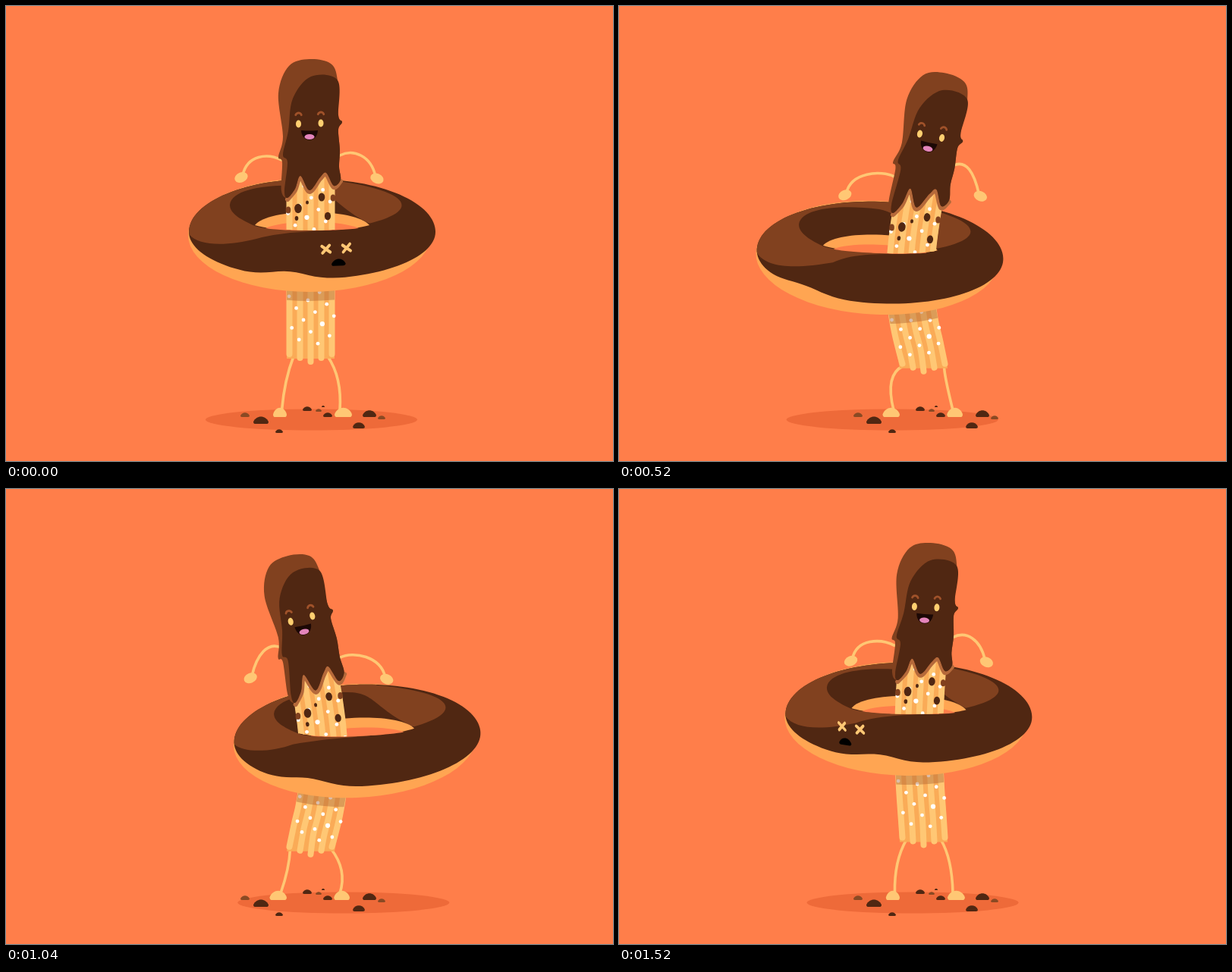
An HTML page with a canvas for the animation above (1.56 s loop, 800 by 600 pixels).

```html
<!DOCTYPE html>
<html>
<head>
<meta charset="utf-8">
<style>
html, body { margin: 0; width: 100%; height: 100%; overflow: hidden; background: #ff7e4a; }
canvas { display: block; }
</style>
</head>
<body>
<canvas id="stage" width="800" height="600"></canvas>
<script>
const ctx = document.getElementById('stage').getContext('2d');
const { sin, cos, PI } = Math, TAU = PI * 2, CYCLE = 780;
const BG = '#ff7e4a', DARK = '#502712', LIGHT = '#81411f', RIM = '#b5693a';
const DOUGH = '#ffa552', CREAM = '#ffc774', STRIPE = '#faab57';

// Chocolate coat: right side downwards, drips leftwards, then each left side upwards
const COAT_RIGHT = [[437, 98], [438, 144], [443, 153], [438, 163], [440, 190], [439, 212]];
const DRIPS = [[441, 229], [432, 237], [422, 220], [414, 226], [400, 243], [388, 224], [381, 241], [371, 253]];
const COAT_LEFT = [[363, 244], [364, 206], [359, 199], [365, 172], [359, 115], [373, 79], [400, 70], [428, 76]];
const FRONT_LEFT = [[367, 244], [371, 206], [365, 196], [372, 165], [378, 122], [402, 93]];

const WALL = new Path2D('M295 262C298 240 350 234 400 238C430 242 430 262 479 287C455 298 350 298 328 290C305 280 295 272 295 262');
const INNER_DOUGH = new Path2D('M328 289C345 266 460 266 479 289C450 298 355 298 328 289');
const HOLE = new Path2D('M342 293C365 282 440 282 465 293C440 297 360 297 342 293');
const ABOVE_LIP = new Path2D('M0-100V288L328 289C355 298 450 298 479 289L800 288V-100Z');

let bend, drop, shift;

const clamp = u => Math.min(Math.max(u, 0), 1);
const range = (n, f) => Array.from({ length: n }, (_, i) => f(i));

// Centre line: a straight head on an arching body
function spine(y) {
  const u = clamp((y - 205) / 250), arch = sin(PI * u), above = Math.max(205 - y, 0);
  return [400 + bend * (18 * arch - .22 * above),
    y + drop * (20 - 3 * u + 23 * arch) + .025 * bend * bend * above];
}

function tilt(y) {
  const [ax, ay] = spine(y - 3), [bx, by] = spine(y + 3);
  return Math.atan2(ax - bx, by - ay);
}

function warp([x, y]) {
  const [sx, sy] = spine(y), a = tilt(y), d = x - 400;
  return [sx + d * cos(a), sy + d * sin(a)];
}

// Smooth curve through points
function trace(points, closed) {
  const n = points.length;
  const at = i => points[closed ? (i + n) % n : Math.min(Math.max(i, 0), n - 1)];
  ctx.beginPath();
  ctx.moveTo(...at(0));
  for (let i = 0; i < (closed ? n : n - 1); i++) {
    const a = at(i - 1), b = at(i), c = at(i + 1), d = at(i + 2);
    ctx.bezierCurveTo(b[0] + (c[0] - a[0]) / 6, b[1] + (c[1] - a[1]) / 6,
      c[0] - (d[0] - b[0]) / 6, c[1] - (d[1] - b[1]) / 6, ...c);
  }
}

function fill(color, path) {
  ctx.fillStyle = color;
  path ? ctx.fill(path) : ctx.fill();
}

function stroke(color, width) {
  ctx.strokeStyle = color;
  ctx.lineWidth = width;
  ctx.stroke();
}

function ellipse(x, y, rx, ry, color, angle = 0) {
  ctx.beginPath();
  ctx.ellipse(x, y, rx, ry, angle, 0, TAU);
  fill(color);
}

function dome(x, base, rx, h, color) {
  ctx.beginPath();
  ctx.moveTo(x - rx, base - h * .3);
  ctx.bezierCurveTo(x - rx * .6, base - h * 1.25, x + rx * .6, base - h * 1.25, x + rx, base - h * .3);
  ctx.quadraticCurveTo(x + rx, base, x + rx * .7, base);
  ctx.lineTo(x - rx * .7, base);
  ctx.quadraticCurveTo(x - rx, base, x - rx, base - h * .3);
  fill(color);
}

function isolated(draw) {
  ctx.save();
  draw();
  ctx.restore();
}

// Runs draw in a frame pinned to the bent stick
function pinned(x, y, draw) {
  isolated(() => {
    ctx.translate(...warp([x, y]));
    ctx.rotate(tilt(y));
    draw();
  });
}

function enterDonut() {
  ctx.translate(403 + shift, 300 + 40 * drop);
  ctx.rotate(-.043 * bend);
  ctx.translate(-403, -300);
}

function stickOutline() {
  const side = x => range(9, i => warp([x, 225 + i * 30]));
  ctx.beginPath();
  [...side(370), ...side(433).reverse()].forEach(p => ctx.lineTo(...p));
  ctx.closePath();
}

function drawStick() {
  stickOutline();
  fill(STRIPE);
  for (let i = 0; i < 5; i++) {
    const end = 469 - 5 * Math.abs(i - 2);
    trace(range(9, j => warp([373.5 + 14 * i, 225 + (end - 225) * j / 8])));
    stroke(CREAM, 8);
  }
  for (let i = 0; i < 42; i++) {
    const r = i % 9 ? 2.4 : 3.1;
    ellipse(...warp([368 + 65 * (i * .382 % 1), 232 + 5.2 * i]), r, r, '#fff');
  }
  for (const [x, y, r] of [[416, 252, 4.3], [424, 277, 4.1], [385, 267, 4.8], [397, 259, 2], [383, 280, 2.3]])
    ellipse(...warp([x, y]), r, r * 1.3, DARK, tilt(y));
  for (const [x, y] of [[372, 269], [431, 253]]) ellipse(...warp([x, y]), 3.3, 4.5, LIGHT);
}

function drawLegs() {
  const leg = (hip, cx, cy, fx) => {
    ctx.beginPath();
    ctx.moveTo(...hip);
    ctx.quadraticCurveTo(cx, cy, fx, 533);
    stroke(CREAM, 3.6);
  };
  leg(warp([379 - 6 * drop, 462]), 367 + 12 * bend - 7 * drop, 493 + 7 * bend, 363.5 - 2 * drop);
  leg(warp([424 + 6 * drop, 462]), 443 + 11 * bend - 5 * drop, 490 + 8 * bend + 6 * drop, 440);
  dome(361 - 3 * drop, 542, 9 + 3 * drop, 12, CREAM);
  dome(444.5 - 2.5 * drop, 542, 11.5 - 1.5 * drop, 12, CREAM);
}

function drawArms() {
  const arm = (sx, sy, hx, hy, side) => {
    ctx.beginPath();
    ctx.moveTo(sx, sy);
    ctx.bezierCurveTo(sx + 18 * side, sy - 9, hx - 8 * side, hy - 30, hx - 2 * side, hy - 3);
    stroke(CREAM, 3.6);
    ellipse(hx, hy, 9, 6.5, CREAM, .4 * side);
  };
  arm(363, 203 - 8 * bend + 19 * drop, 310 + 12.5 * bend, 226 + 31 * drop, -1);
  arm(440, 197 + 6 * bend + 26 * drop, 489 + 13 * bend, 227.5 + 31 * drop, 1);
}

function drawDonutFace(spin) {
  const put = (angle, radius, y, draw) => {
    const c = cos(angle), s = sin(angle);
    if (c < .06) return;
    isolated(() => {
      ctx.transform(c, -.22 * s, 0, 1, 403 + radius * s, y + 38 * c);
      draw();
    });
  };
  for (const side of [-1, 1]) put(spin + side * .096, 145, 283, () => {
    ctx.beginPath();
    ctx.moveTo(-5.5, -4); ctx.lineTo(5.5, 4);
    ctx.moveTo(-4.5, 5); ctx.lineTo(4.5, -5);
    stroke(CREAM, 4);
  });
  put(spin, 158, 301, () => dome(0, 4.5, 9.5, 9, '#000'));
}

// Elliptic crust whose lower hem has one wandering dent
function crustOutline() {
  const dentX = 372 + 18 * bend - 72 * drop;
  ctx.beginPath();
  for (let a = 0; a < TAU; a += .05) {
    const x = 403.5 + 162.5 * cos(a);
    const ry = sin(a) < 0 ? 70 : 62 + 3 * drop - 9 * Math.exp(-(((x - dentX) / 35) ** 2));
    ctx.lineTo(x, 298 + ry * sin(a));
  }
  ctx.closePath();
}

function drawDonut(spin) {
  ellipse(400, 302, 160, 75, DOUGH);
  crustOutline();
  fill(DARK);
  isolated(() => {
    ctx.clip();
    ctx.beginPath();
    ctx.moveTo(238, 296);
    ctx.bezierCurveTo(248, 318 - 5 * bend, 290, 317 - 5 * bend, 330 - 12 * bend, 307 - 4 * bend);
    ctx.bezierCurveTo(370, 296, 410, 298, 440, 294);
    ctx.bezierCurveTo(550, 278, 550, 246, 432, 230);
    ctx.lineTo(400, 200);
    ctx.lineTo(200, 200);
    fill(LIGHT);
  });
  fill(DARK, WALL);
  fill(DOUGH, INNER_DOUGH);
  fill(BG, HOLE);
  drawDonutFace(spin);
}

function drawHead() {
  trace(DRIPS.map(([x, y]) => warp([x, y + 2])));
  stroke(RIM, 6);
  for (const [left, color] of [[COAT_LEFT, LIGHT], [FRONT_LEFT, DARK]]) {
    trace([...COAT_RIGHT, ...DRIPS, ...left].map(warp), true);
    fill(color);
  }
  for (const [x, y] of [[385.5, 155.5], [415, 154.5]]) pinned(x, y, () => {
    ellipse(0, 0, 3.5, 5, '#ffcf70');
    ctx.beginPath();
    ctx.arc(0, -10.5, 4, PI * 1.1, PI * 1.9);
    stroke('#a0522a', 2.8);
  });
  pinned(400, 164, () => {
    ctx.beginPath();
    ctx.moveTo(-11, 0);
    ctx.quadraticCurveTo(0, 1, 11, 0);
    ctx.bezierCurveTo(10, 17, -10, 17, -11, 0);
    fill('#1c0805');
    ctx.clip();
    ellipse(0, 8.5, 6.5, 3.6, '#e485bb');
  });
}

function drawGround() {
  ellipse(402.5 + .71 * shift, 545.5, 139.5, 14, '#ee6a39');
  const crumbs = [[336, 551, 10], [360, 563, 5], [397, 534, 6], [418, 529, 2], [424, 542, 6],
    [479, 542, 9], [465, 557, 8], [315, 542, 6], [412, 535, 4], [495, 545, 5]];
  crumbs.forEach(([x, y, r], i) => dome(x, y, r, r * .95, i < 7 ? DARK : '#8a4a24'));
}

function render(ms) {
  const a = Math.floor(ms / 40) * 40 % CYCLE / CYCLE * TAU;
  shift = 66.6 * sin(a) + 3.4 * sin(3 * a) - 2.2 * sin(5 * a);
  bend = shift / 61;
  drop = (1 - cos(a)) / 2;
  const spin = a + .28 * Math.tanh(7 * sin(a + .16));

  ctx.lineCap = ctx.lineJoin = 'round';
  ctx.fillStyle = BG;
  ctx.fillRect(0, 0, 800, 600);
  drawGround();
  drawLegs();
  drawStick();
  isolated(() => {
    stickOutline();
    ctx.clip();
    enterDonut();
    ellipse(400, 314, 160, 75, 'rgba(165,90,45,.4)');
  });
  isolated(() => {
    enterDonut();
    drawDonut(spin);
  });
  drawArms();

  // The upper stick ends at the front lip of the hole
  isolated(() => {
    const base = ctx.getTransform();
    enterDonut();
    ctx.clip(ABOVE_LIP);
    ctx.setTransform(base);
    drawStick();
  });
  drawHead();
}

const start = performance.now();
function tick() {
  render(performance.now() - start);
  requestAnimationFrame(tick);
}
tick();
</script>
</body>
</html>
```
